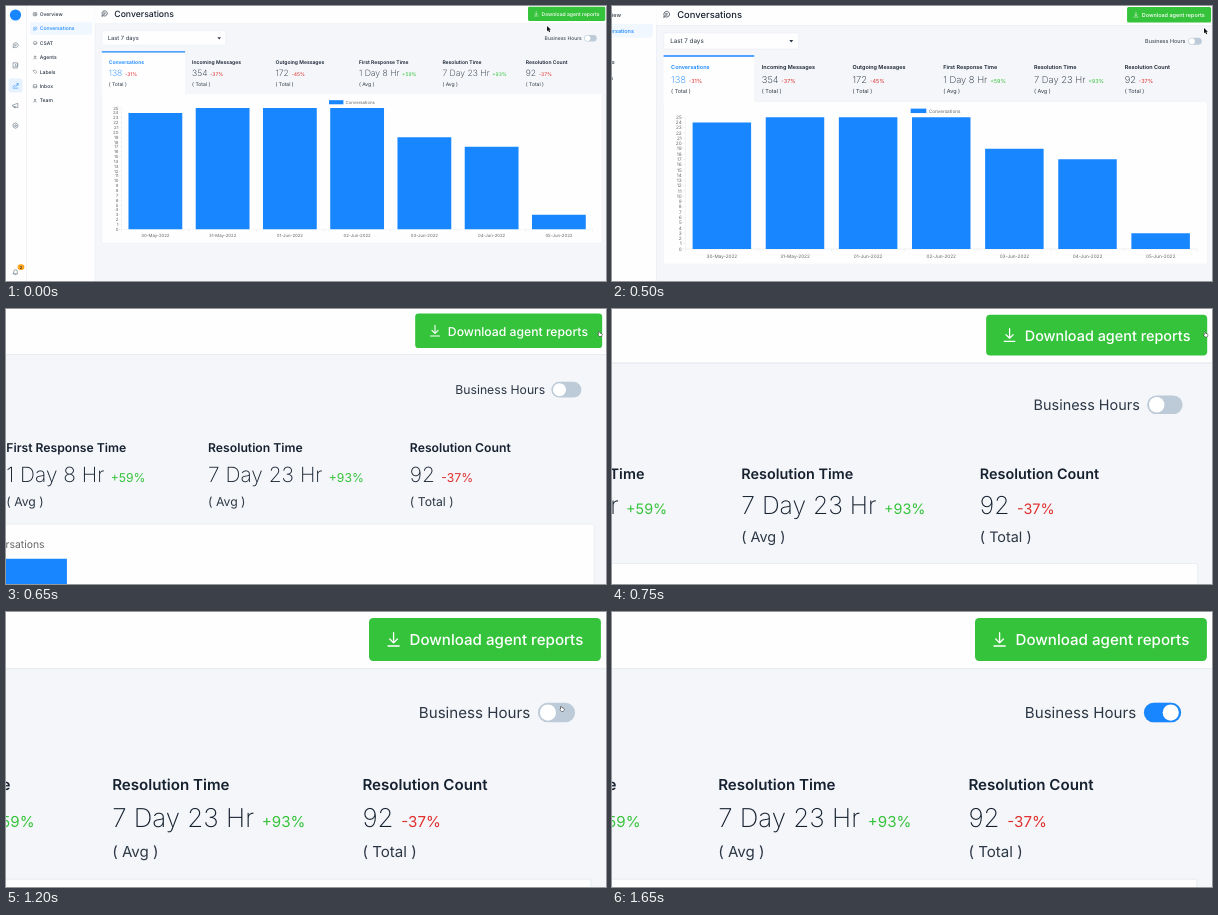
Recreate the animation shown at these times as an HTML page with a canvas. Size 600 by 275 pixels, loop 1.9 s.

```html
<!DOCTYPE html>
<html lang="en">
<head>
<meta charset="utf-8">
<title>Conversation reports</title>
<style>
  html, body { margin: 0; width: 100%; height: 100%; overflow: hidden; background: #fefefe; }
  canvas { display: block; width: 600px; height: 275px; }
</style>
</head>
<body>
<canvas id="stage"></canvas>
<script>
const W = 600, H = 275, LOOP = 1900, STEP = 50;
const canvas = document.getElementById('stage');
const ctx = canvas.getContext('2d');
const dpr = window.devicePixelRatio || 1;
canvas.width = W * dpr;
canvas.height = H * dpr;

const WHITE = '#fefefe', PAGE = '#f4f6f9', LINE = '#e4eaf0', INK = '#162130';
const SLATE = '#2c3745', BLUE = '#1786ff', GREEN = '#36c33c', RED = '#e0302f';
const BODY = 5.04, TITLE = 8.64, TICK = 4.3;
const FOCUS = { x: 601.5, y: -2 };

// Time tracks: [time, value...]
const ZOOM = [[450, 1], [500, 1.0874], [550, 1.6], [600, 2.05], [650, 2.419], [700, 2.7],
  [750, 2.86], [800, 2.94], [850, 2.98], [900, 2.996], [1000, 3]];
const POINTER = [[0, 541, 20], [50, 562, 21], [100, 585, 22], [150, 592, 22], [600, 592, 22],
  [900, 591.5, 23.5], [1000, 591.5, 23.5], [1050, 588, 34], [1100, 575, 62], [1150, 560, 89],
  [1200, 554, 94], [1400, 554, 94], [1450, 510, 124], [1500, 370, 206], [1550, 285, 248]];
const TOGGLE = [[1250, 0], [1300, 0.15], [1350, 0.5], [1400, 0.85], [1450, 1]];

const METRICS = [
  ['Conversations', '138', '-31%', 'Total'],
  ['Incoming Messages', '354', '-37%', 'Total'],
  ['Outgoing Messages', '172', '-45%', 'Total'],
  ['First Response Time', '1 Day 8 Hr', '+59%', 'Avg'],
  ['Resolution Time', '7 Day 23 Hr', '+93%', 'Avg'],
  ['Resolution Count', '92', '-37%', 'Total']
];
const DAYS = [['30-May', 24], ['31-May', 25], ['01-Jun', 25], ['02-Jun', 25],
  ['03-Jun', 19], ['04-Jun', 17], ['05-Jun', 3]];

// Icons on a 24-unit grid
const ICON = {
  chat: 'M4 20 L5 15.5 A8.5 8.5 0 1 1 8.5 19 Z M9 10 H15 M9 14 H13',
  book: 'M5 3 H18 V21 H5 Z M9 16 C9 13 15 13 15 16 M12 8 V11 M20 6 V9 M20 12 V15',
  trend: 'M3 17 L9 11 L13 15 L21 6 M16 6 H21 V11 M4 21 H20',
  horn: 'M3 10 L20 4 V19 L3 14 Z M7 15 V19 H12 V17',
  gear: 'M12 3 L20 7.5 V16.5 L12 21 L4 16.5 V7.5 Z M15 12 A3 3 0 1 1 9 12 A3 3 0 1 1 15 12',
  bell: 'M4 18 H20 L18 15 V10 A6 6 0 0 0 6 10 V15 Z M10 21 H14',
  grid: 'M4 4 H20 V20 H4 Z M4 12 H20 M12 4 V20',
  face: 'M21 12 A9 9 0 1 1 3 12 A9 9 0 1 1 21 12 M8 14 C10 17 14 17 16 14',
  people: 'M15 8 A4 4 0 1 1 7 8 A4 4 0 1 1 15 8 M3 20 C4 13 18 13 19 20',
  tag: 'M4 4 H12 L21 13 L13 21 L4 12 Z',
  tray: 'M4 4 H20 V20 H4 Z M4 14 H9 L11 17 H13 L15 14 H20',
  download: 'M12 2 V16 M6.5 11 L12 16.5 L17.5 11 M4 21 H20'
};
const NAV = [['Overview', 'grid'], ['Conversations', 'chat'], ['CSAT', 'face'],
  ['Agents', 'people'], ['Labels', 'tag'], ['Inbox', 'tray'], ['Team', 'people']];

function track(keys, t) {
  if (t <= keys[0][0]) return keys[0].slice(1);
  for (let i = 1; i < keys.length; i++) {
    const [a, ...from] = keys[i - 1], [b, ...to] = keys[i];
    if (t <= b) return from.map((v, j) => v + (to[j] - v) * (t - a) / (b - a));
  }
  return keys[keys.length - 1].slice(1);
}

function rect(x, y, w, h, fill, r = 0, stroke) {
  ctx.beginPath();
  ctx.roundRect(x, y, w, h, r);
  ctx.fillStyle = fill;
  ctx.fill();
  if (stroke) {
    ctx.strokeStyle = stroke;
    ctx.lineWidth = 0.4;
    ctx.stroke();
  }
}

function disc(x, y, r, fill) {
  ctx.beginPath();
  ctx.arc(x, y, r, 0, Math.PI * 2);
  ctx.fillStyle = fill;
  ctx.fill();
}

// Draws text on its baseline and returns its width.
function text(str, x, y, size, color, weight = 400, align = 'left') {
  const k = size / 14;
  ctx.save();
  ctx.translate(x, y);
  ctx.scale(k, k);
  ctx.font = `${weight} 14px Inter, sans-serif`;
  ctx.textRendering = 'geometricPrecision';
  ctx.textAlign = align;
  ctx.fillStyle = color;
  ctx.fillText(str, 0, 0);
  const width = ctx.measureText(str).width * k;
  ctx.restore();
  return width;
}

function icon(name, cx, cy, size, color, weight = 2) {
  ctx.save();
  ctx.translate(cx - size / 2, cy - size / 2);
  ctx.scale(size / 24, size / 24);
  ctx.strokeStyle = color;
  ctx.lineWidth = weight;
  ctx.lineCap = ctx.lineJoin = 'round';
  ctx.stroke(new Path2D(ICON[name]));
  ctx.restore();
}

function drawSidebar() {
  rect(0, 0, 89, 300, WHITE);
  rect(20, 0, 0.5, 300, LINE);
  rect(88.8, 0, 0.5, 300, LINE);
  disc(9.5, 9, 5.6, BLUE);
  rect(2.5, 72.5, 14, 14, '#e6f2ff', 2);
  ['chat', 'book', 'trend', 'horn', 'gear'].forEach((name, i) =>
    icon(name, 9.5, 39.3 + i * 20.1, 7, name === 'trend' ? BLUE : '#5d6b7b'));
  icon('bell', 9.5, 266, 7, '#5d6b7b');
  rect(11.7, 258.3, 6.6, 5.6, '#ffa51f', 2.6);
  text('2', 15, 262.6, 4, INK, 500, 'center');

  rect(24, 16.2, 62, 12.6, '#f0f7ff', 1.5);
  NAV.forEach(([label, name], i) => {
    const y = 8.2 + i * 14.4, color = i === 1 ? BLUE : SLATE;
    icon(name, 29.2, y, 4.6, color);
    text(label, 33.7, y + 1.8, BODY, color, 500);
  });
}

function drawHeader() {
  rect(89, -10, 520, 27.5, WHITE);
  rect(89, 17.4, 520, 0.35, LINE);
  icon('chat', 98.5, 7.6, 7.4, INK);
  text('Conversations', 108.3, 10.7, TITLE, INK, 500);
  rect(522, 0.67, 77.3, 14.33, GREEN, 1.4);
  icon('download', 530.2, 7.9, 5.6, '#fff', 1.9);
  text('Download agent reports', 535.5, 9.8, BODY, '#fff', 500);
}

function drawFilters(on) {
  rect(96, 24.6, 123.8, 14.8, WHITE, 1.2, '#e0e7ee');
  text('Last 7 days', 101.8, 34.1, 5.76, SLATE);
  ctx.beginPath();
  ctx.moveTo(211.4, 31.2);
  ctx.lineTo(215, 31.2);
  ctx.lineTo(213.2, 33.4);
  ctx.fillStyle = SLATE;
  ctx.fill();

  text('Business Hours', 538.6, 33.85, BODY, SLATE);
  rect(578.3, 28.95, 12.4, 6.5, '#bccbd7', 3.25);
  ctx.globalAlpha = on;
  rect(578.3, 28.95, 12.4, 6.5, BLUE, 3.25);
  ctx.globalAlpha = 1;
  disc(581.65 + 5.6 * on, 32.2, 2.7, '#fff');
}

function drawMetrics() {
  rect(95.8, 45.4, 83.3, 43, WHITE);
  rect(95.8, 45.2, 83.3, 1.2, BLUE);
  METRICS.forEach(([name, value, delta, kind], i) => {
    const x = 102.7 + i * 83.42, active = i === 0;
    text(name, x, 58, BODY, active ? BLUE : INK, 600);
    const w = text(value, x, 70.4, TITLE, active ? BLUE : INK, 150);
    text(delta, x + w + 2.6, 70.4, BODY, delta[0] === '+' ? GREEN : RED);
    text(`( ${kind} )`, x, 80.3, BODY, SLATE);
  });
}

function drawChart() {
  const left = 115.75, bottom = 223.3, unit = 4.85, slot = 67.25, bar = 53.8;
  rect(95.8, 87.7, 500.2, 149.3, WHITE, 0.8, '#eaeff3');
  rect(95.9, 86.5, 83.1, 2, WHITE);
  rect(323, 94.2, 14.4, 4.1, BLUE);
  text('Conversations', 339.6, 97.8, TICK, '#666');

  for (let n = 0; n <= 25; n++) {
    const y = bottom - n * unit;
    rect(left - 2.6, y - 0.15, 2.6, 0.3, '#dcdfe3');
    text(n, 112.4, y + 1.5, TICK, '#666', 400, 'right');
  }
  rect(left - 0.15, 102, 0.3, bottom - 102 + 2.6, '#dcdfe3');
  rect(left, bottom - 0.15, slot * 7, 0.3, '#dcdfe3');
  DAYS.forEach(([day, count], i) => {
    const cx = left + (i + 0.5) * slot;
    rect(cx - bar / 2, bottom - count * unit, bar, count * unit, BLUE);
    rect(cx + slot / 2 - 0.15, bottom, 0.3, 2.6, '#dcdfe3');
    text(`${day}-2022`, cx, 231.2, TICK, '#666', 400, 'center');
  });
}

function drawPointer(t) {
  if (t >= 1650) return;
  const [x, y] = track(POINTER, t);
  const hand = t >= 650 && t < 1450;
  ctx.save();
  ctx.translate(x, y);
  ctx.lineJoin = 'round';
  const shape = new Path2D(hand
    ? 'M0.6 0.6 Q1.2 0 1.6 0.8 L1.8 2 L3.6 2.4 Q4.2 2.7 3.9 3.8 L3.4 5 H1.4 L0 3.2 L0.9 3 Z'
    : 'M0 0 V5.2 L1.2 4.2 L2.2 6.2 L3.2 5.7 L2.3 3.8 H3.9 Z');
  ctx.strokeStyle = hand ? '#222' : '#fff';
  ctx.lineWidth = 1;
  ctx.stroke(shape);
  ctx.fillStyle = hand ? '#fff' : '#111';
  ctx.fill(shape);
  ctx.restore();
}

function draw(t) {
  const [zoom] = track(ZOOM, t);
  const [on] = track(TOGGLE, t);
  ctx.setTransform(dpr, 0, 0, dpr, 0, 0);
  rect(0, 0, W, H, PAGE);
  ctx.save();
  ctx.translate(FOCUS.x, FOCUS.y);
  ctx.scale(zoom, zoom);
  ctx.translate(-FOCUS.x, -FOCUS.y);
  drawSidebar();
  drawHeader();
  drawFilters(on);
  drawChart();
  drawMetrics();
  ctx.restore();
  drawPointer(t);
}

const start = performance.now();
function frame() {
  const t = (performance.now() - start) % LOOP;
  draw(Math.floor(t / STEP) * STEP);
  requestAnimationFrame(frame);
}
frame();
</script>
</body>
</html>
```
